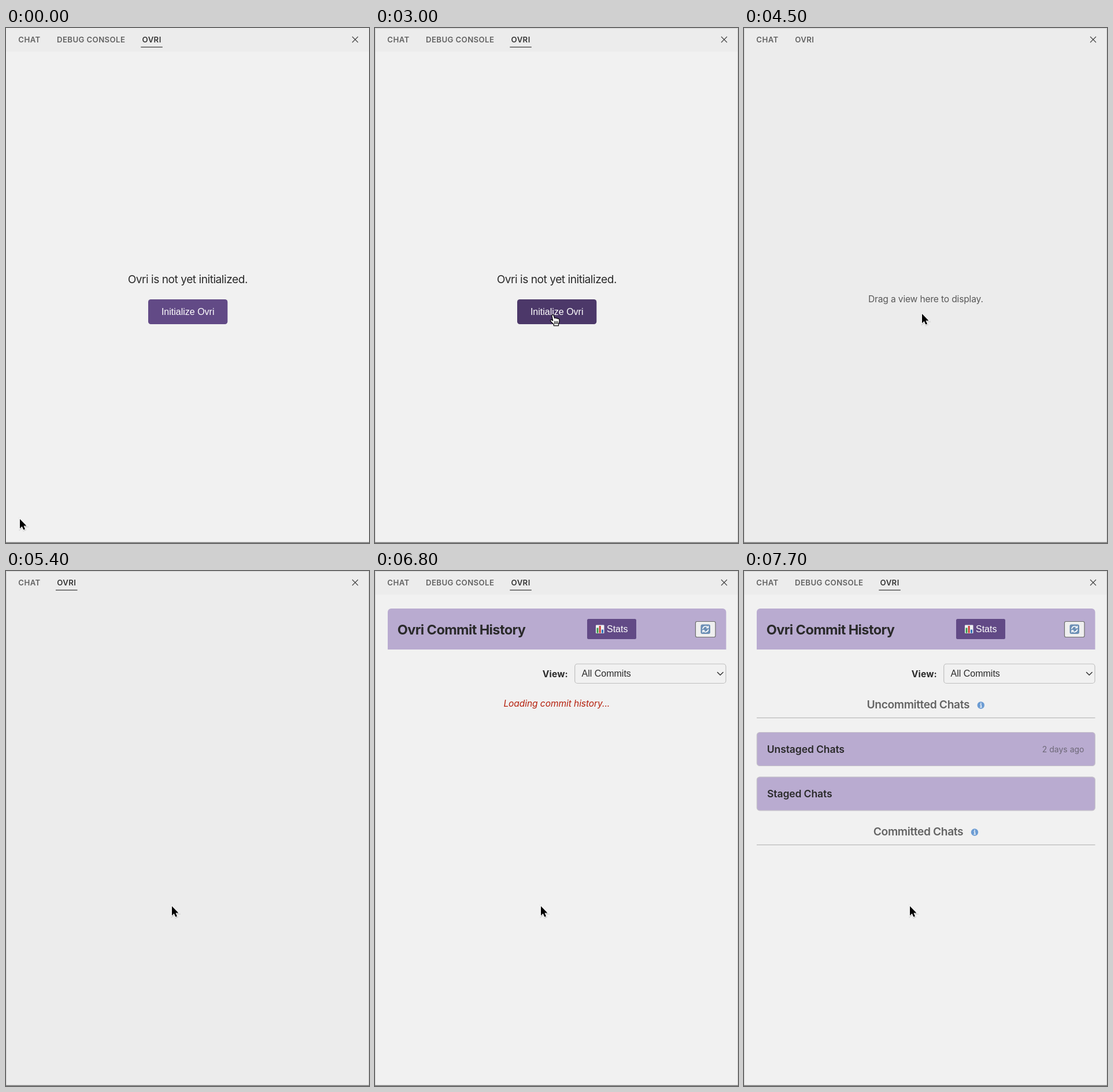
Recreate the animation shown at these times as an HTML page. Size 628 by 892 pixels, loop 8700 ms.

```html
<!DOCTYPE html>
<html lang="en">
<head>
<meta charset="utf-8">
<title>Panel setup</title>
<style>
  html, body { margin: 0; width: 100%; height: 100%; overflow: hidden; background: #ececec; }
  svg { display: block; width: 628px; height: 892px; }
  text { font-family: Inter, "Noto Sans", sans-serif; fill: #2a2a2a; white-space: pre; }
  .tab { font-size: 13.2px; font-weight: 600; letter-spacing: .4px; fill: #616161; }
  .on { fill: #333; }
  .ui { font-family: "Liberation Sans", Arial, sans-serif; font-size: 16px; }
  .mid { text-anchor: middle; }
  .white { fill: #fff; }
  .section { font-size: 19.2px; font-weight: 600; letter-spacing: -.36px; fill: #636363; }
  .card { font-size: 17.5px; font-weight: 600; letter-spacing: -.1px; }
  .line { fill: none; stroke-linecap: round; stroke-linejoin: round; }
</style>
</head>
<body>
<svg viewBox="0 0 628 892">
  <defs>
    <g id="info">
      <circle r="6.2" fill="#6c9cd3"/>
      <path d="M-1.5 -.9H.4V3.2M-1.7 3.3H1.9" fill="none" stroke="#fff" stroke-width="1.3"/>
      <circle cy="-3.3" r="1" fill="#fff"/>
    </g>
  </defs>

  <rect width="628" height="892" fill="#ececec"/>
  <rect id="page" y="41" width="628" height="850" fill="#f1f1f1"/>

  <g id="chrome">
    <text class="tab" x="21.3" y="24.7">CHAT</text>
    <path d="M599 15L609 25M609 15L599 25" stroke="#444" stroke-width="1.2"/>
  </g>
  <text class="tab" id="console" x="88" y="24.7">DEBUG CONSOLE</text>
  <g id="tab">
    <text class="tab" id="tabName" x="2.3" y="24.7">OVRI</text>
    <rect id="underline" y="32.5" width="37.5" height="1.2" fill="#333"/>
  </g>
  <rect id="progress" y="39" height="2.4" fill="#624a86"/>

  <g id="welcome">
    <text class="mid" x="314.3" y="442" font-size="19.2" letter-spacing="-.5">Ovri is not yet initialized.</text>
    <rect id="button" x="246" y="470" width="137.3" height="43" rx="4.5"/>
    <text class="ui mid white" x="314.7" y="497">Initialize Ovri</text>
  </g>

  <text id="drag" class="mid" x="314.4" y="474.5" font-size="15.6" letter-spacing="-.17" style="fill:#585858">Drag a view here to display.</text>

  <g id="history">
    <path d="M22 136V71a6 6 0 0 1 6-6H601.5a6 6 0 0 1 6 6V136Z" fill="#b9abd0"/>
    <text x="38.8" y="110" font-size="23.5" font-weight="700" letter-spacing="-.6">Ovri Commit History</text>

    <rect x="367" y="83" width="85" height="35" rx="2.5" fill="#624a86"/>
    <rect x="382" y="93.5" width="14.5" height="14.5" rx="1" fill="#eef1f3"/>
    <path d="M385 107.5V98.5" stroke="#3a9b4b" stroke-width="3"/>
    <path d="M389.2 107.5V95" stroke="#cf3b35" stroke-width="3"/>
    <path d="M393.5 107.5V101.5" stroke="#3275bd" stroke-width="3"/>
    <text class="ui white" x="401" y="106.2">Stats</text>

    <rect x="554.5" y="87.5" width="34.5" height="27" rx="2.5" fill="#efefef" stroke="#6d6d6d" stroke-width="1.2"/>
    <rect x="563.5" y="92.5" width="16.5" height="16.5" rx="3" fill="#6c8fb5"/>
    <g class="line" stroke="#fff" stroke-width="1.5">
      <path d="M567 100A5 5 0 0 1 576 98M576.6 95.6V98.6H573.6"/>
      <path d="M576.6 101.5A5 5 0 0 1 567.6 103.5M567 106V103H570"/>
    </g>

    <text x="289.8" y="184" font-size="15.6" font-weight="700" letter-spacing=".15">View:</text>
    <rect x="345.7" y="161" width="261.3" height="33.5" rx="4.5" fill="#f1f1f1" stroke="#bfbfbf" stroke-width="1.2"/>
    <text class="ui" x="357.5" y="183.3">All Commits</text>
    <path class="line" d="M592.5 175.5L597.3 180.3L602.1 175.5" stroke="#333" stroke-width="1.5"/>
  </g>

  <text id="loading" class="mid" x="314.3" y="234.5" font-size="15.6" font-style="italic" letter-spacing="-.1" style="fill:#b5200d">Loading commit history...</text>

  <g id="chats">
    <text class="section" x="212.5" y="237.8">Uncommitted Chats</text>
    <use href="#info" x="409.8" y="232.5"/>
    <text class="section" x="223.8" y="457.8">Committed Chats</text>
    <use href="#info" x="399" y="452.5"/>
    <path d="M22 254.3H607.5M22 474.3H607.5" stroke="#bababa" stroke-width="1.2"/>
    <g fill="#b9abd0" stroke="#c4c0c9" stroke-width="1.2">
      <rect x="22.3" y="279.5" width="585" height="58" rx="4.8"/>
      <rect x="22.3" y="356.8" width="585" height="58" rx="4.8"/>
    </g>
    <text class="card" x="39.8" y="315.3">Unstaged Chats</text>
    <text class="card" x="40" y="392.3">Staged Chats</text>
    <text x="588.5" y="314" font-size="14" text-anchor="end" style="fill:#6d6877">2 days ago</text>
  </g>

  <path id="border" d="M.5 891V.5H627.5V891" fill="none" stroke="#d2d2d2"/>
  <rect y="890.6" width="628" height="1.4" fill="#737373"/>

  <g id="arrow">
    <path d="M0 0V16.2L3.7 12.8L6.3 18.6L9 17.4L6.5 11.7H11.4Z" transform="translate(.3 1)" fill="#000" stroke="#000" stroke-opacity=".1" stroke-width="3.4"/>
    <path d="M0 0V16.2L3.7 12.8L6.3 18.6L9 17.4L6.5 11.7H11.4Z" fill="#000" stroke="#fff" stroke-width="2" paint-order="stroke"/>
  </g>
  <g id="hand" class="line" stroke="#000" stroke-width="1.2">
    <path d="M3.6 2.9C3.2 .8 6.3 .3 6.9 2.3L8.3 7C9 6 10.8 6 11.2 7.3C12 6.4 13.6 6.8 13.8 8C15 7.4 16.6 8.1 16.6 9.6V13.5L15.2 17V20H7V17.6L1.8 12.6C.2 10.6 2 8.9 3.8 10.2L5.4 11.3Z" fill="#fff"/>
    <path d="M8.5 12.5V16.8M11 12.5V16.8M13.5 12.5V16.8"/>
  </g>
</svg>
<script>
  const LOOP = 8700, STEP = 100;
  const $ = id => document.getElementById(id);
  const show = (id, on) => $(id).setAttribute('visibility', on ? 'visible' : 'hidden');
  const place = (id, x, y) => $(id).setAttribute('transform', `translate(${x} ${y})`);

  // Pointer waypoints: time, x, y
  const route = [
    [1400, 24, 850.5], [1900, 287, 537.5], [2200, 308, 495],
    [4700, 308, 495], [5300, 287, 580.5]
  ];
  const smooth = p => p * p * (3 - 2 * p);
  const easeOut = p => 1 - (1 - p) ** 2;

  function pointer(t) {
    const next = route.findIndex(stop => stop[0] > t);
    if (next < 0) return route[route.length - 1].slice(1);
    if (!next) return route[0].slice(1);
    const [a, b] = [route[next - 1], route[next]];
    const p = (t - a[0]) / (b[0] - a[0]);
    const k = next === 2 ? easeOut(p) : smooth(p);
    return [1, 2].map(i => a[i] + (b[i] - a[i]) * k);
  }

  function draw(t) {
    const between = (from, to) => t >= from && t < to;
    const hover = between(2000, 3700);
    const shortTabs = between(4500, 5700);
    const chrome = !between(3800, 4500);

    show('page', t < 3700 || t >= 6500);
    show('welcome', t < 3700);
    $('button').setAttribute('fill', hover ? '#4c3869' : '#624a86');
    show('drag', between(4500, 5400));
    show('history', t >= 6500);
    show('loading', between(6600, 7600));
    show('chats', t >= 7600);
    show('border', t >= 2000);

    show('chrome', chrome);
    show('console', chrome && !shortTabs);
    show('tab', chrome);
    place('tab', shortTabs ? 86 : 233.3, 0);
    const active = chrome && !between(4500, 5400);
    show('underline', active);
    $('tabName').classList.toggle('on', active);

    // Indeterminate bar slides and widens
    const run = Math.max(0, t - 5450) / 1000;
    const width = 12.56 * (1 + run);
    show('progress', between(5500, 6200));
    $('progress').setAttribute('x', 6.28 + 157 * run - width / 2);
    $('progress').setAttribute('width', width);

    const [x, y] = pointer(t);
    show('arrow', !hover);
    show('hand', hover);
    place('arrow', x, y);
    place('hand', x - 5.7, y + .7);
  }

  const start = performance.now();
  function tick() {
    const t = (performance.now() - start) % LOOP;
    draw(Math.floor(t / STEP) * STEP);
    requestAnimationFrame(tick);
  }
  tick();
</script>
</body>
</html>
```
